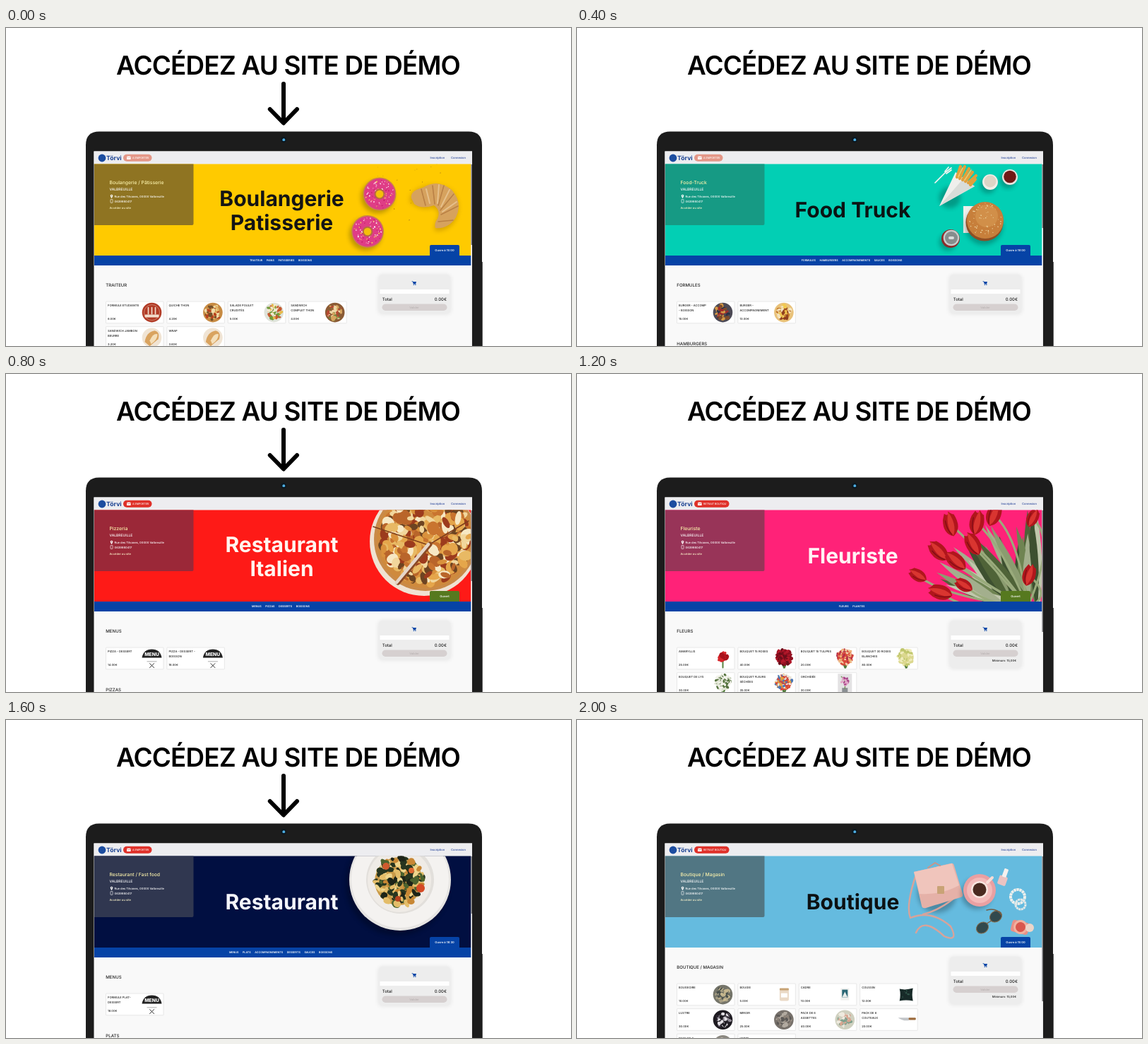
Write an HTML page that moves like this. It is 800 by 450 pixels and loops after 2.4 s.

```html
<!DOCTYPE html>
<html lang="fr">
<head>
<meta charset="utf-8">
<title>Site de démo</title>
<style>
html, body { margin: 0; width: 100%; height: 100%; overflow: hidden; background: #fff; }
svg { display: block; width: 800px; height: 450px; }
text { font-family: Inter, "Open Sans", sans-serif; font-weight: 500; white-space: pre; text-rendering: geometricPrecision; }
</style>
</head>
<body>
<svg id="stage" viewBox="0 0 800 450">
  <defs>
    <clipPath id="screen"><rect x="124.5" y="174.5" width="535.5" height="276"/></clipPath>
    <clipPath id="banner"><rect x="125" y="192.5" width="533.5" height="129.5"/></clipPath>
    <filter id="soft" x="-20%" y="-20%" width="140%" height="140%"><feGaussianBlur stdDeviation="3"/></filter>
  </defs>
  <text x="399.5" y="66" font-size="36.8" style="font-weight:600" letter-spacing="-.8" text-anchor="middle">ACCÉDEZ AU SITE DE DÉMO</text>
  <path id="arrow" d="M393 79V134M373.8 115L393 134.5L412 115" fill="none" stroke="#000" stroke-width="6" stroke-linecap="round" stroke-linejoin="round"/>
  <path d="M113 460V165.5Q113 146.5 132 146.5H655Q674 146.5 674 165.5V460Z" fill="#1c1c1c"/>
  <rect x="673" y="331" width="1.7" height="120" fill="#1c1c1c"/>
  <circle cx="393" cy="158" r="4" fill="#0c1820"/>
  <circle cx="393.3" cy="158.2" r="1.9" fill="#4fb0e6"/>
  <g id="site" clip-path="url(#screen)"></g>
</svg>
<script>
const FRAME_MS = 400;
const BLUE = '#0643a6', GREEN = '#56791f', SALMON = '#e49788', RED = '#df3029';
let seed = 1;
const random = () => (seed = seed * 16807 % 2147483647) / 2147483647;

// Drawing helpers: each returns SVG markup.
const rect = (x, y, w, h, fill, rx = 0, more = '') =>
  `<rect x="${x}" y="${y}" width="${w}" height="${h}" rx="${rx}" fill="${fill}" ${more}/>`;
const circle = (x, y, r, fill, more = '') => `<circle cx="${x}" cy="${y}" r="${r}" fill="${fill}" ${more}/>`;
const path = (d, fill, more = '') => `<path d="${d}" fill="${fill}" ${more}/>`;
const line = (d, stroke, width) =>
  path(d, 'none', `stroke="${stroke}" stroke-width="${width}" stroke-linecap="round" stroke-linejoin="round"`);
const text = (x, y, size, fill, label, anchor = 'start', weight = 500) =>
  `<text x="${x}" y="${y}" font-size="${size}" fill="${fill}" text-anchor="${anchor}" style="font-weight:${weight}">${label}</text>`;
const place = (x, y, angle, content) => `<g transform="translate(${x} ${y}) rotate(${angle})">${content}</g>`;
const shadow = (x, y, r) => circle(x, y, r, '#000', 'opacity=".25" filter="url(#soft)"');

function blobs(x, y, r, colors, count, size) {
  let out = '';
  for (let i = 0; i < count; i++) {
    const angle = random() * 6.283, distance = Math.sqrt(random()) * (r - size), rx = size * (.5 + random() * .6);
    out += `<ellipse rx="${rx}" ry="${rx * (.4 + random() * .5)}" fill="${colors[i % colors.length]}"
      transform="translate(${x + distance * Math.cos(angle)} ${y + distance * Math.sin(angle)}) rotate(${random() * 180})"/>`;
  }
  return out;
}

// Product thumbnails, drawn around the origin.
const dish = (base, ...colors) => () => circle(0, 0, 13.8, base) + blobs(0, 0, 13.5, colors, 45, 3.4);
const bouquet = (...colors) => () => line('M-4 2L0 13M5 2L1 13M0 2V13', '#4f7a3a', 2) +
  circle(0, -2, 11, colors[0]) + blobs(0, -2, 14, colors, 80, 2.6);
const cutlery = color => line('M-3 -3L3 3M3 -3L-3 3', color, 1);
const menu = () => path('M-14 -1Q-12 -13 0 -13Q12 -13 14 -1Z', '#222') +
  text(0, -3.2, 6.8, '#fff', 'MENU', 'middle', 800) + rect(-7, 4, 14, .6, '#777') + place(0, 10, 0, cutlery('#333'));
const student = () => circle(0, 0, 13.8, '#b13a25') + circle(0, 0, 11, 'none', 'stroke="#e0b39d" stroke-width=".6"') +
  line('M-5 -7V2M0 -7V2M5 -7V2', '#f2ddcc', 1.7) + rect(-10, 3, 20, 4, '#f2ddcc', 1);
const roll = () => circle(0, 0, 13.8, '#f0e4d4') +
  path('M-10 6Q-8 -8 4 -10Q12 -8 9 2L-3 12Z', '#d9a35f') + path('M-3 4Q2 -7 8 -5Q8 3 -1 9Z', '#f4dfba');
const amaryllis = () => line('M0 0V13', '#58823f', 2) + blobs(0, -2, 10, ['#d7252a', '#a9131d'], 22, 5);
const orchid = () => rect(-10, -14, 20, 28, '#e3e2e3') + rect(-4, 6, 8, 8, '#8a8f92') +
  line('M0 7Q2 -6 -5 -10', '#6a8a4c', 1.2) + blobs(0, -4, 8, ['#a9468a', '#e3a6c9'], 14, 3);
const candle = () => rect(-6, -8, 13, 17, '#ead9c6', 2) + rect(-4, -2, 9, 6, '#fff') + rect(-6, -9, 13, 3, '#c7a375', 1);
const picture = () => rect(-6, -9, 12, 17, '#f1f1ef') + rect(-4, -7, 8, 11, '#2a6674') + path('M-4 4L0 -4L4 4Z', '#e8ecea');
const cushion = () => path('M-9 -8Q0 -6 10 -9Q8 0 10 9Q0 7 -9 9Q-7 0 -9 -8Z', '#172a28') + blobs(0, 0, 7, ['#31564a'], 8, 1.3);
const knife = () => path('M-11 -3H5L4 1Q-5 2 -11 -3Z', '#c2c5c8') + rect(4, -3, 10, 3.4, '#9c6b3d', 1);

// Banner pictures.
function donut(x, y, r) {
  return shadow(x - 3, y + 4, r) + circle(x, y, r, '#c9824b') + circle(x, y, r - 1.6, '#df3d86') +
    blobs(x, y, r - 2, ['#f9b5d2', '#c41e68', '#fff', '#f7cf5b'], 80, 1.2) +
    circle(x, y, r * .32, '#b56b43') + circle(x, y, r * .23, '#f4bf08');
}
const bakery = () => blobs(570, 218, 55, ['#a87416'], 24, .8) + donut(529, 235, 23.5) + donut(512, 288, 23) +
  path('M572 246Q571 232 588 226Q612 216 632 231Q647 250 636 273Q624 289 607 287Q606 278 611 270Q616 258 604 254Q588 260 572 246Z', '#a97900', 'opacity=".45" filter="url(#soft)"') +
  path('M574 241Q572 230 590 226Q612 212 632 230Q647 248 637 268Q626 285 608 283Q606 276 611 270Q616 258 606 251Q588 257 578 249Z', '#d6a25e') +
  line('M588 228L594 251M604 223L607 249M620 223L612 251M634 235L615 258M640 252L616 264M633 272L612 274', '#b98045', 1.6) +
  line('M595 228L600 248M613 222L611 248M628 229L616 253M638 246L618 260', '#e6c08b', 2);

const truck = () => shadow(528, 240, 15) + path('M513 252L536 204L563 224Z', '#efefec') + path('M513 252L548 212L563 224Z', '#d9dcd8') +
  line('M538 211L543 196M542 213L549 196M546 215L555 199M550 217L560 204M554 219L565 209M557 222L564 214', '#e0a03c', 4.2) +
  line('M540 210L546 198M549 215L558 201', '#f5c867', 1.6) +
  line('M507 219L522 204M522 204L530 198M521 203L526 197M523 206L530 201', '#f2f4f1', 1.7) +
  shadow(582, 223, 11) + circle(585, 218, 11, '#f1eee8') + circle(585, 217, 8.5, '#ddd5c6') +
  shadow(610, 216, 11) + circle(613, 211, 11, '#e8e4de') + circle(613, 210.5, 8.8, '#701915') +
  rect(547, 252, 34, 38, '#eef0ec') + shadow(576, 280, 27) +
  circle(577, 275, 26.5, '#8e4f24') + circle(578, 272, 26, '#c77f3b') + circle(580, 266, 16, '#d99a52', 'opacity=".6"') +
  blobs(578, 271, 24, ['#efd9a4'], 65, .9) +
  shadow(525, 303, 12) + circle(529, 298, 13, '#8b2c2b') + circle(530, 297, 11.3, '#c7cccb') + circle(530, 297, 9, '#858d8d') +
  rect(526, 295, 8, 4, '#d9dddc', 2);

const pizza = () => circle(592, 237, 77, '#f0e2d2') + circle(594, 234, 73, '#c98a48') + circle(594, 234, 69, '#cf8a3d') +
  blobs(594, 234, 71, ['#c9742f', '#f1d69c', '#9c3b1d', '#e5a64b', '#f7e8c4', '#b9652a', '#e8b964', '#6d4422', '#d9913c'], 420, 9) +
  line('M598 242L520 216M598 242L655 208', '#7f3f1c', 1.6) + line('M555 295L600 241', '#8b4a25', 7) + line('M553 295L598 241', '#e6d6c8', 4.5);

const tulip = (x, y, angle, scale = 1) => place(x, y, angle, `<g transform="scale(${scale})">` +
  path('M0 17Q-14 10 -9 -9L-5 -17Q0 -11 1 -19Q6 -13 8 -13Q15 9 0 17Z', '#b0161c') +
  path('M0 16Q-8 3 1 -18Q9 2 0 16Z', '#d93530') + line('M-6 -7Q-7 6 -2 14', '#7d0d14', 1.3) + '</g>');
function florist() {
  const flowers = [[529, 213, -15], [566, 211, 10], [590, 199, 20], [561, 241, -30], [512, 251, -45], [537, 265, -50],
    [483, 285, -60, .8], [515, 309, -75], [548, 299, -60, .8], [640, 285, 15, .9], [645, 204, 25, .8]];
  const greens = ['#4f6338', '#a3af8d', '#6f8452', '#c0c7ac', '#3d5030', '#8b9c70'];
  let leaves = '';
  for (let i = 0; i < 26; i++) {
    const length = 95 + 50 * random();
    leaves += place(655 - 40 * random(), 335, -80 + 95 * random(),
      path(`M0 0Q-13 ${-length / 2} 0 ${-length}Q11 ${-length / 2} 0 0Z`, greens[i % greens.length]));
  }
  return leaves +
    flowers.map(([x, y]) => line(`M${x} ${y}Q${x + 35} ${y + 30} 638 330`, '#9aab7c', 3)).join('') +
    flowers.map(flower => tulip(...flower)).join('');
}

const restaurant = () => shadow(554, 232, 73) + circle(558, 226, 72, '#e6e4e2') + circle(558, 225, 69, '#f4f2f0') +
  circle(558, 226, 48, '#e2dfdb') + circle(557, 227, 45, '#efebe6') + circle(556, 228, 34, '#c99a48') +
  blobs(556, 228, 40, ['#e4bd69', '#27351f', '#c88734', '#4c632e', '#efd58c', '#1d2418'], 170, 6) +
  circle(587, 238, 6, '#d54a25') + circle(538, 207, 5, '#cf5b2e') + circle(574, 213, 4, '#df6932') + circle(555, 253, 4, '#b7421f');

const lens = (x, y) => `<ellipse cx="${x}" cy="${y}" rx="9" ry="7.5" transform="rotate(-35 ${x} ${y})" fill="#31494d" stroke="#876c4c"/>`;
const shop = () => shadow(510, 245, 28) +
  line('M481 216Q465 262 472 280Q502 268 529 292Q541 315 520 306Q490 278 480 301M540 247Q515 269 490 275', '#d8a39a', 2.4) +
  path('M477 215L529 203Q533 202 534 206L546 246Q547 250 543 251L494 266Q489 267 488 263Z', '#e5b1a8') +
  path('M477 215L531 203L541 234Q515 248 485 246Z', '#f0c5bc') + rect(510, 235, 10, 11, '#c9a376', 1) + line('M497 209L507 202L514 206', '#c99589', 2) +
  shadow(566, 246, 22) + circle(570, 241, 23, '#e9a0a2') + circle(570, 241, 18, '#f2bab9') + circle(570, 240, 12, '#f8e5df') +
  circle(570, 240, 9.5, '#4a2a20') + line('M581 230L588 223', '#f8dcd6', 4) +
  place(604, 223, 20, rect(-6, -2, 12, 13, '#eac3c2', 2) + rect(-3, -13, 6, 12, '#f5f1ef', 1)) +
  circle(624, 250, 10, 'none', 'stroke="#eef0ed" stroke-width="4" stroke-dasharray="3.5 .6"') +
  circle(628, 261, 7, 'none', 'stroke="#e2e9e8" stroke-width="3" stroke-dasharray="3 .6"') +
  lens(574, 294) + lens(593, 278) + line('M580 288L587 284M601 276Q594 265 580 269', '#765c43', 1.4) +
  place(628, 293, 15, rect(-13, -8, 25, 17, '#e98f86', 4) + circle(0, 0, 10, '#f0b19f') + circle(0, 0, 7, '#d9574d')) +
  circle(641, 294, 6, '#ecd5c9');

const scenes = [
  { kind: 'Boulangerie / Pâtisserie', title: ['Boulangerie', 'Patisserie'], ink: '#141414', art: bakery, back: '#ffca00', panel: '#8f7422',
    pill: SALMON, open: 'Ouvre à 15:00', thumb: 114, nav: ['TRAITEUR', 'PAINS', 'PATISSERIES', 'BOISSONS'], heading: 'TRAITEUR',
    cards: [['FORMULE ETUDIANTE', '6.00€', student], ['QUICHE THON', '4.20€', dish('#c78b43', '#e2b667', '#76512b', '#b8431f', '#f1dca9')],
      ['SALADE POULET|CRUDITÉS', '5.00€', dish('#dfe3da', '#6f9b38', '#e6b949', '#c65a30', '#f2ead2')],
      ['SANDWICH|COMPLET THON', '4.00€', dish('#8b5b35', '#d8a55e', '#6e873d', '#b64931', '#efd7a5')],
      ['SANDWICH JAMBON|BEURRE', '3.20€', roll], ['WRAP', '3.60€', roll]] },
  { kind: 'Food-Truck', title: ['Food Truck'], ink: '#0b1413', art: truck, back: '#02cfb4', panel: '#169a84',
    pill: SALMON, open: 'Ouvre à 19:00', thumb: 90, nav: ['FORMULES', 'HAMBURGERS', 'ACCOMPAGNEMENTS', 'SAUCES', 'BOISSONS'],
    heading: 'FORMULES', next: 'HAMBURGERS',
    cards: [['BURGER - ACCOMP|- BOISSON', '15.00€', dish('#4d4a55', '#a12d2a', '#d59a45', '#2c3044', '#7d4b2b')],
      ['BURGER -|ACCOMPAGNEMENT', '13.00€', dish('#e9c27a', '#c47a2c', '#f1c94f', '#8f3f1e', '#f4e3bd')]] },
  { kind: 'Pizzeria', title: ['Restaurant', 'Italien'], ink: '#fff4ee', art: pizza, back: '#fe1a17', panel: '#9b2838',
    pill: RED, open: 'Ouvert', thumb: 100, nav: ['MENUS', 'PIZZAS', 'DESSERTS', 'BOISSONS'], heading: 'MENUS', next: 'PIZZAS',
    cards: [['PIZZA - DESSERT', '14.00€', menu], ['PIZZA - DESSERT -|BOISSON', '18.00€', menu]] },
  { kind: 'Fleuriste', title: ['Fleuriste'], ink: '#fff2f4', art: florist, back: '#ff2278', panel: '#983458',
    pill: RED, pickup: true, open: 'Ouvert', thumb: 172, minimum: true, nav: ['FLEURS', 'PLANTES'], heading: 'FLEURS',
    cards: [['AMARYLLIS', '25.00€', amaryllis],
      ['BOUQUET 15 ROSES', '40.00€', bouquet('#8f0f20', '#b3182a', '#6a0d1a')],
      ['BOUQUET 15 TULIPES', '20.00€', bouquet('#d94b3c', '#edae75', '#b52d48', '#f0d1ab')],
      ['BOUQUET 30 ROSES|BLANCHES', '80.00€', bouquet('#dcd88f', '#bfc66c', '#efebbb')],
      ['BOUQUET DE LYS', '30.00€', bouquet('#f2f2ea', '#dfe3d2', '#56733f')],
      ['BOUQUET FLEURS|SÉCHÉES', '35.00€', bouquet('#d6473c', '#4a77b5', '#e8a13e', '#e9e5da')],
      ['ORCHIDÉE', '30.00€', orchid]] },
  { kind: 'Restaurant / Fast food', title: ['Restaurant'], ink: '#f4f5fa', art: restaurant, back: '#010f41', panel: '#303750',
    pill: RED, open: 'Ouvre à 18:30', thumb: 81, nav: ['MENUS', 'PLATS', 'ACCOMPAGNEMENTS', 'DESSERTS', 'SAUCES', 'BOISSONS'],
    heading: 'MENUS', next: 'PLATS', cards: [['FORMULE PLAT-|DESSERT', '16.00€', menu]] },
  { kind: 'Boutique / Magasin', title: ['Boutique'], ink: '#0c1113', art: shop, back: '#65bbdf', panel: '#517683',
    pill: RED, pickup: true, open: 'Ouvre à 15:00', thumb: 205, minimum: true, heading: 'BOUTIQUE / MAGASIN',
    cards: [['BOUGEOIRE', '10.00€', dish('#75756a', '#a59d83', '#4b514c', '#c5b68e')], ['BOUGIE', '5.00€', candle],
      ['CADRE', '10.00€', picture], ['COUSSIN', '12.00€', cushion],
      ['LUSTRE', '30.00€', dish('#1d1a20', '#e2dfe4', '#2c2630', '#8d8792', '#1d1a20')], ['MIROIR', '25.00€', dish('#77716b', '#b2aaa0', '#8d8379', '#5d5a57')],
      ['PACK DE 6|ASSIETTES', '40.00€', dish('#cfd0bf', '#7fa08d', '#d6a691', '#eeeade')], ['PACK DE 6|COUTEAUX', '20.00€', knife],
      ['PACK DE 6', '15.00€', dish('#8b8880', '#b9b3a6')], ['VERRE', '8.00€', candle]] },
];

function header({ pill, pickup }) {
  return rect(124, 174, 537, 18.5, '#ededf0') + circle(136, 184, 5.4, '#1c4da0') + text(142, 187.3, 8.6, '#173f91', 'Törvi', 'start', 700) +
    rect(166, 178.8, pickup ? 49.5 : 40.5, 10, pill, 5) + rect(171, 181.6, 5.6, 4.4, '#fff', .5) + line('M171.4 182.3L173.8 184L176.2 182.3', pill, .6) +
    text(179, 185.4, 3.6, '#fff', pickup ? 'RETRAIT BOUTIQU' : 'A EMPORTER') +
    text(600.5, 185.4, 4.1, '#29469a', 'Inscription') + text(630, 185.4, 4.1, '#29469a', 'Connexion');
}

function banner({ back, art, panel, kind, title, ink, open }) {
  const firstLine = title.length > 1 ? 251.5 : 268;
  return `<g clip-path="url(#banner)">${rect(125, 192, 534, 130, back)}${art()}</g>` +
    path('M125 192.5H265.5V277Q265.5 279 263.5 279H125Z', panel) +
    text(146.5, 221, 6.8, '#fcf3ac', kind) + text(146.5, 230, 5, '#fff', 'VALBREUILLE') +
    path('M149.5 241Q145.8 236 149.5 235.7Q153.2 236 149.5 241Z', '#fff') + circle(149.5, 237.5, .7, panel) +
    rect(148, 242.4, 3, 5, 'none', .6, 'stroke="#fff" stroke-width=".6"') +
    text(153.5, 239.8, 4.1, '#fff', 'Rue des Tilvanes, 00000 Valbreuille') + text(153.5, 246.6, 4.1, '#fff', '0639980417') +
    text(146.5, 256, 4.1, '#fdf6cc', 'Accéder au site') +
    title.map((label, i) => text(390.5, firstLine + 34 * i, 30, ink, label, 'middle', 700)).join('') +
    path('M600 322V309Q600 307 602 307H640Q642 307 642 309V322Z', open === 'Ouvert' ? GREEN : BLUE) +
    text(621, 316, 4.1, '#fff', open, 'middle', 600);
}

function card([label, price, thumbnail], i) {
  const x = 141.5 + 86.4 * (i % 4), y = 387 + 35.6 * Math.floor(i / 4);
  return rect(x, y, 81.5, 30.8, '#fff', .5, 'stroke="#e2e2e2" stroke-width=".8"') + place(x + 65, y + 15.6, 0, thumbnail()) +
    label.split('|').map((part, row) => text(x + 2.5, y + 7.4 + 7 * row, 4.1, '#222', part)).join('') +
    text(x + 2.5, y + 26.3, 4.1, '#222', price);
}

function cart(minimum) {
  const height = minimum ? 67 : 55;
  return rect(527, 349, 103, height + 1, '#000', 6, 'opacity=".08" filter="url(#soft)"') + rect(528, 349, 101, height, '#ededed', 5) +
    line('M575 358.7H576.2L577.2 362H580', BLUE, .8) + path('M576.3 359H581L580 362H577Z', BLUE) +
    circle(577.3, 363.2, .7, BLUE) + circle(579.8, 363.2, .7, BLUE) +
    rect(529.5, 370, 98, 6, '#fff') + text(532.7, 385.5, 6, '#222', 'Total') + text(624, 385.5, 6, '#222', '0.00€', 'end') +
    rect(532.5, 390.5, 92, 9.5, '#d6d0d0', 4.75) + text(578, 396.8, 4, '#b7b0b0', 'Valider', 'middle') +
    (minimum ? text(622, 407, 4.2, '#222', 'Minimum: 15,00€', 'end') : '');
}

function page(scene) {
  const { nav, heading, next, cards, minimum, thumb } = scene;
  return rect(124, 174, 537, 277, '#f9f9f9') + header(scene) + banner(scene) +
    (nav ? rect(125, 322, 533.5, 14, BLUE) + text(389, 330.4, 3.7, '#fff', nav.join('      '), 'middle', 600) : '') +
    place(0, nav ? 0 : -14, 0, text(141.3, 366, 6.1, '#222', heading) + cards.map(card).join('') + cart(minimum) +
      (next ? text(141.3, 449.4, 6.1, '#222', next) : '')) +
    rect(658.5, 192.5, 1.5, 258, '#eee') + rect(658.5, 193, 1.5, thumb, '#77777a');
}

const pages = scenes.map(page);
const site = document.getElementById('site'), arrow = document.getElementById('arrow');
let shown = -1;
function draw() {
  const index = Math.floor(performance.now() / FRAME_MS) % pages.length;
  if (index !== shown) {
    site.innerHTML = pages[index];
    arrow.style.visibility = index % 2 ? 'hidden' : 'visible';
    shown = index;
  }
  requestAnimationFrame(draw);
}
draw();
</script>
</body>
</html>
```
